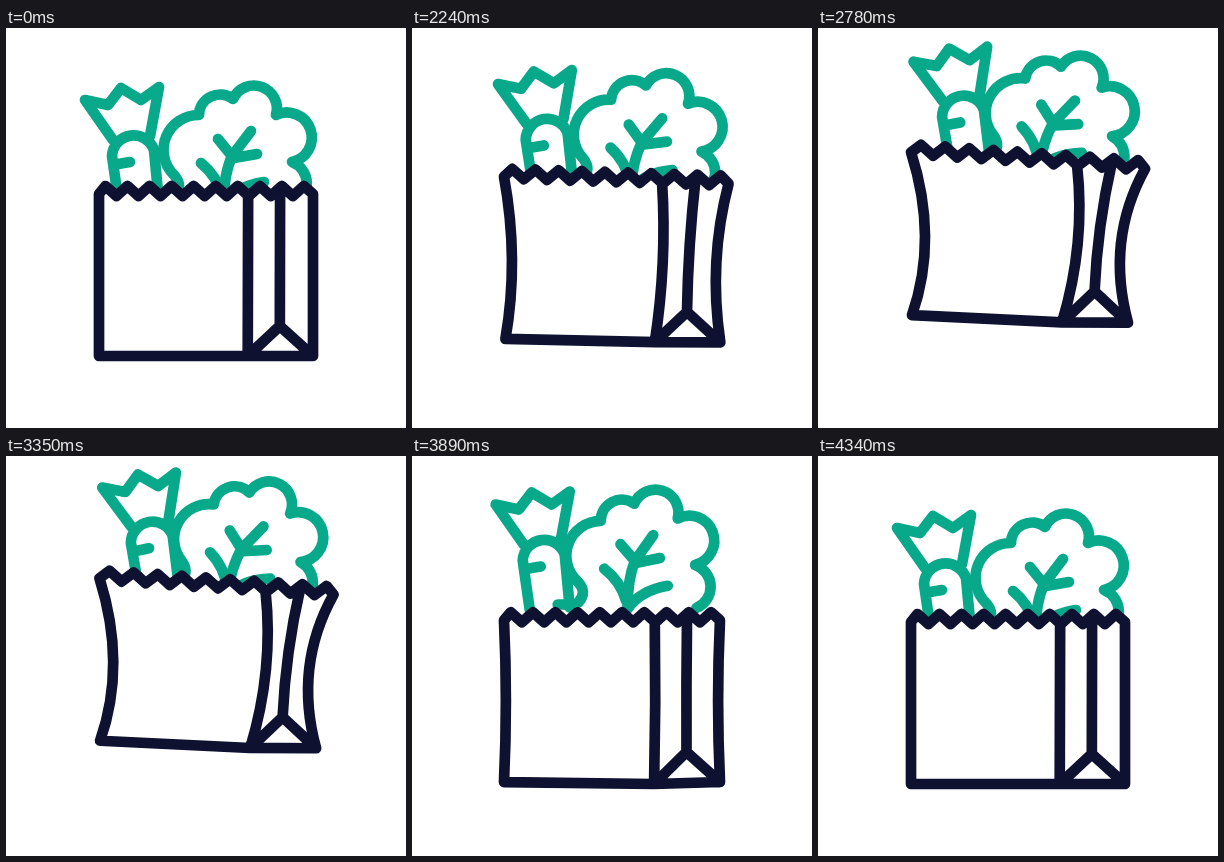
These frames come from a looping animation (400x400 px, 4370 ms). An HTML page with a canvas:

```html
<!DOCTYPE html>
<html lang="en">
<head>
<meta charset="utf-8">
<title>Grocery bag</title>
<style>
html, body { margin: 0; width: 100%; height: 100%; overflow: hidden; background: #fff; }
canvas { display: block; }
</style>
</head>
<body>
<canvas id="stage" width="400" height="400"></canvas>
<script>
const ctx = document.getElementById('stage').getContext('2d');
const LOOP = 4370, NAVY = '#0e1130', GREEN = '#08a88a', TEETH = 10;

const carrot = new Path2D(
  'M107 112L79 72L102 77L115 60L135 72L153 59L144 108' +
  'M113 177L106 128A21.6 21.6 0 0 1 148 122L153 175M112 136L124 134M153 172H141');
const cauliflower = new Path2D(
  'M168 168Q178 158 168 147A35 35 0 0 1 193 87A21 21 0 0 1 227 71' +
  'A23 23 0 0 1 270 87A25 25 0 1 1 286 134A23 23 0 0 1 286 177' +
  'M245 103L226 128Q218 146 217 176M212 111L225 127M251 126L228 130' +
  'M195 135Q211 148 216 168M258 154Q230 158 217 176');

// sway: sideways lean of the rim, lift: height of the base, flare: wide rim and thin waist,
// tilt: slope of the rim in degrees, sag: drop of the front corner, hop: vegetables on their own
const rest = { sway: 0, lift: 0, flare: 0, tilt: 0, sag: 0, hop: 0 };
const pose = changes => ({ ...rest, ...changes });
const lifted = pose({ sway: 9.5, lift: -34, flare: 1, tilt: 4, sag: 2 });
const high = pose({ sway: 5, lift: -49, flare: 1, tilt: 2, sag: 10 });

const smooth = t => (1 - Math.cos(Math.PI * t)) / 2;
const speedUp = t => t ** 1.5;
const slowDown = t => 1 - (1 - t) ** 2;

// Each easing leads from its own key to the next one.
const keys = [
  [0, rest, () => 0],
  [2030, pose({ flare: .15 }), smooth],
  [2480, lifted, slowDown],
  [3350, { ...lifted, sway: 10.5, lift: -39.5 }, smooth],
  [3640, { ...high, lift: -51 }, speedUp],
  [3680, high, speedUp],
  [3890, pose({ lift: -2, flare: .1, sag: 2, hop: -22 }), slowDown],
  [4040, pose({ sway: -2, hop: 6 }), smooth],
  [4190, pose({ hop: -2 }), smooth],
  [4340, rest, smooth],
  [LOOP, rest]
];

const mix = (a, b, t) => a + (b - a) * t;
const between = (p, q, t) => p.map((v, i) => mix(v, q[i], t));
const offset = ([x, y], dx, dy) => [x + dx, y + dy];
const radians = degrees => degrees * Math.PI / 180;

function poseAt(time) {
  const n = keys.findIndex(k => k[0] > time);
  const [t0, from, ease] = keys[n - 1], [t1, to] = keys[n];
  const t = ease((time - t0) / (t1 - t0));
  return Object.fromEntries(Object.keys(rest).map(k => [k, mix(from[k], to[k], t)]));
}

// A sloping row of the bag; u runs from -1 (left edge) to 1 (right edge).
const row = (x, y, half, tilt) =>
  u => [x + u * half, y + u * half * Math.tan(radians(tilt))];

function drawVeg(path, px, py, dx, dy, angle) {
  ctx.save();
  ctx.translate(px + dx, py + dy);
  ctx.rotate(radians(angle));
  ctx.translate(-px, -py);
  ctx.stroke(path);
  ctx.restore();
}

// Curve from a to b that passes through mid halfway.
function bend(a, mid, b) {
  ctx.quadraticCurveTo(...mid.map((m, i) => 2 * m - (a[i] + b[i]) / 2), ...b);
}

function drawBag(rim, waist, base, { flare, sag }) {
  const firstTooth = offset(rim(-.94), 3 * flare, -8);
  const lastTooth = offset(rim(.915), 3 * flare, -8);
  const edge = (u, drop) => offset(between(firstTooth, lastTooth, u), 0, drop);
  const corner = offset(base(.39), 0, sag);

  ctx.beginPath();
  ctx.moveTo(...rim(-1));
  for (let i = 0; i <= 18; i++) ctx.lineTo(...edge(i / 18, i % 2 * TEETH));
  ctx.lineTo(...rim(1));
  bend(rim(1), waist(1), base(1));
  ctx.lineTo(...corner);
  ctx.lineTo(...base(-1));
  bend(base(-1), waist(-1), rim(-1));
  ctx.closePath();
  ctx.fill();

  const crease = (top, bottom, bulge) => {
    ctx.moveTo(...top);
    bend(top, offset(between(top, bottom, .5), bulge * flare, 0), bottom);
  };
  const tip = offset(base(.69), 0, -30);
  crease(edge(.719, TEETH), corner, 8);
  ctx.lineTo(...tip);
  ctx.lineTo(...base(1));
  crease(edge(.88, 3), tip, -3);
  ctx.stroke();
}

function draw(time) {
  const p = poseAt(time);
  const { sway, lift, flare, tilt, sag, hop } = p;
  const rim = row(200 + sway, 166 + .9 * lift, 107 + 10 * flare, tilt);
  const waist = row(200 + sway / 2, 247 + .95 * lift, 107 - 9 * flare, tilt / 2);
  const base = row(200 + sway / 5, 328 + lift, 107 + sag / 2, tilt / 2);
  const ride = u => rim(u)[1] - 167 + hop + (1 - flare);

  ctx.fillStyle = '#fff';
  ctx.fillRect(0, 0, 400, 400);
  ctx.lineWidth = 10.7;
  ctx.lineCap = ctx.lineJoin = 'round';
  ctx.strokeStyle = GREEN;
  drawVeg(cauliflower, 235, 120, sway + .15 * hop, ride(.33), 1.7 * tilt + .08 * hop);
  drawVeg(carrot, 130, 130, 1.8 * sway - .22 * hop, ride(-.65), -.4 * tilt);
  ctx.strokeStyle = NAVY;
  drawBag(rim, waist, base, p);
}

const start = performance.now();
function tick() {
  draw((performance.now() - start) % LOOP);
  requestAnimationFrame(tick);
}
tick();
</script>
</body>
</html>
```
